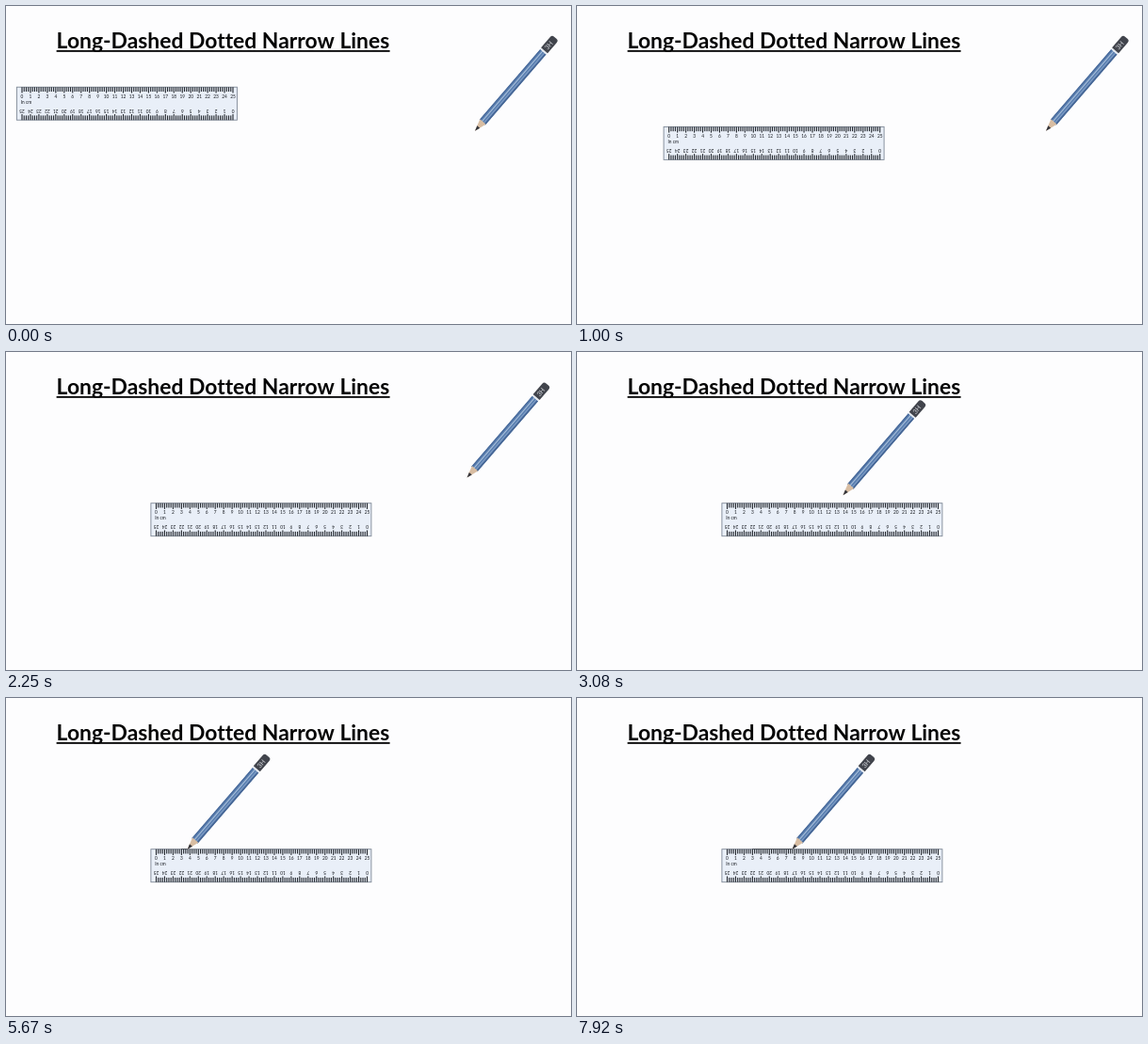
An HTML page with a canvas that plays this animation: 600x338 px, repeating every 8 s.

```html
<!DOCTYPE html>
<html lang="en">
<head>
<meta charset="utf-8">
<title>Long-Dashed Dotted Narrow Lines</title>
<style>
  html, body { margin: 0; width: 100%; height: 100%; overflow: hidden; background: #fdfdfe; }
  canvas { display: block; width: 600px; height: 338px; }
</style>
</head>
<body>
<canvas id="stage"></canvas>
<script>
const W = 600, H = 338, LOOP = 8000, FPS = 12;
const FONT = 'Lato, "Open Sans", sans-serif';
const canvas = document.getElementById('stage');
const ctx = canvas.getContext('2d');
const ratio = window.devicePixelRatio || 1;
canvas.width = Math.round(W * ratio);
canvas.height = Math.round(H * ratio);

const clamp = v => Math.min(1, Math.max(0, v));
const easeInOut = u => u < 0.5 ? 2 * u * u : 1 - 2 * (1 - u) ** 2;
const progress = (t, start, length) => easeInOut(clamp((t - start) / length));

function rect(x, y, w, h, color) {
  ctx.fillStyle = color;
  ctx.fillRect(x, y, w, h);
}

function label(text, x, y, font, color, align = 'center') {
  ctx.font = `${font} ${FONT}`;
  ctx.textAlign = align;
  ctx.fillStyle = color;
  ctx.fillText(text, x, y);
}

function drawTitle() {
  const text = 'Long-Dashed Dotted Narrow Lines';
  const left = 53.6, width = 354, ink = '#050505';
  ctx.letterSpacing = '0.01px'; // keeps the double t unjoined
  ctx.font = `bold 22px ${FONT}`;
  const size = 22 * width / ctx.measureText(text).width;
  label(text, left, 45, `bold ${size}px`, ink, 'left');
  ctx.letterSpacing = '0px';
  rect(left, 47, width, 1.8, ink);
}

// One numbered edge, with its zero at the given distance from the corner.
function drawScale(zero) {
  const cm = 8.96, perCm = 4;
  for (let i = 0; i <= 25 * perCm; i++) {
    const length = i % perCm ? 4.8 : 6.2;
    rect(zero + i * cm / perCm - 0.55, 0, 1.1, length, '#20242a');
  }
  for (let n = 0; n <= 25; n++) label(n, zero + n * cm, 11.6, '4.8px', '#15181e');
}

function drawRuler(x, y) {
  const w = 234, h = 35;
  ctx.save();
  ctx.translate(x, y);
  rect(0, 0, w, h, '#e9eff8');
  ctx.strokeStyle = '#7d8795';
  ctx.lineWidth = 0.9;
  ctx.strokeRect(0, 0, w, h);
  drawScale(5.6);
  label('In cm', 4.4, 17.4, '4.8px', '#15181e', 'left');
  ctx.translate(w, h);
  ctx.rotate(Math.PI);
  drawScale(4.4);
  ctx.restore();
}

// A band along the pencil, widening evenly from its point to the given end.
function cone(end, halfWidth, color) {
  ctx.fillStyle = color;
  ctx.beginPath();
  ctx.moveTo(0, 0);
  ctx.lineTo(end, -halfWidth);
  ctx.lineTo(end, halfWidth);
  ctx.fill();
}

// Drawn along the x axis with its point at the origin.
function drawPencil(x, y) {
  const wood = 12, body = 111, end = 130.7, half = 4.1;
  ctx.save();
  ctx.translate(x, y);
  ctx.rotate(Math.atan2(-99, 85.3));
  rect(wood, -half, body - wood, 2 * half, '#5a7fb0');
  rect(wood, -half, body - wood, 1.2, '#48699a');
  rect(wood, half - 1.4, body - wood, 1.4, '#456594');
  rect(wood, -1.5, body - wood, 1, '#a9bfda');
  rect(wood, 1.3, body - wood, 0.8, '#8ba7cc');
  cone(wood + 1, half, '#d8bda2');
  cone(5.8, 1.9, '#33343a');
  rect(body, -half, 1.8, 2 * half, '#e4e8ee');
  ctx.fillStyle = '#41444c';
  ctx.beginPath();
  ctx.roundRect(body + 1.8, -half - 0.5, end - body - 1.8, 2 * half + 1, [0, 3, 3, 0]);
  ctx.fill();
  label('3H', 120, 2.5, '7px', '#d5d7dc');
  ctx.restore();
}

function draw(t) {
  ctx.setTransform(ratio, 0, 0, ratio, 0, 0);
  rect(0, 0, W, H, '#fdfdfe');
  drawTitle();

  const slide = progress(t, 65, 1750);
  drawRuler(11.4 + 142.5 * slide, 86.2 + 74.5 * slide);

  const reach = progress(t, 2052, 1700);
  const drawn = (0.00175 * Math.max(0, t - 4190)) ** 2;
  const tipX = 498 - 312 * reach + drawn;
  const tipY = 132.8 + 28 * reach;
  rect(tipX - drawn, 160, drawn, 0.9, 'rgba(40,44,52,0.6)');
  drawPencil(tipX, tipY);
}

const begin = performance.now();
function tick() {
  const t = (performance.now() - begin) % LOOP;
  draw(Math.floor((t + 5) * FPS / 1000) * 1000 / FPS % LOOP);
  requestAnimationFrame(tick);
}
tick();
</script>
</body>
</html>
```
